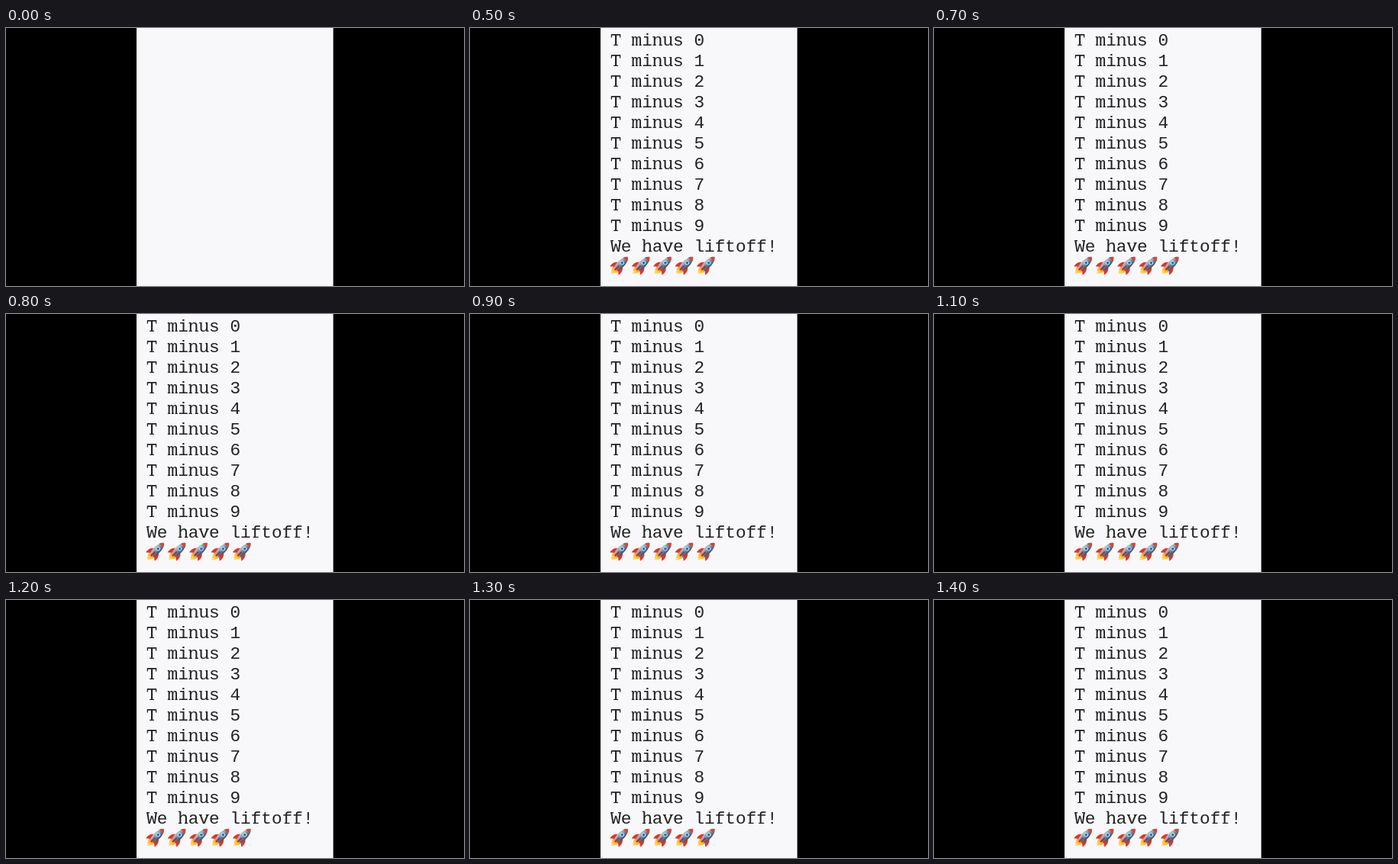
An HTML page for the animation above (1500 ms loop, 600 px wide and 338 px high).

```html
<!DOCTYPE html>
<html lang="en">
<head>
<meta charset="utf-8">
<title>Countdown</title>
<style>
  html, body { margin: 0; width: 100%; height: 100%; overflow: hidden; background: #000; }
  svg { display: block; width: 100vw; height: 100vh; }
  text { font: 22.75px "Liberation Mono", monospace; fill: #222; white-space: pre; }
  #serifs { fill: none; stroke: #222; stroke-width: 1.3; }
</style>
</head>
<body>
<svg viewBox="0 0 600 338">
  <defs>
    <linearGradient id="hull">
      <stop offset="0" stop-color="#bccbd6"/>
      <stop offset=".45" stop-color="#7893a8"/>
      <stop offset="1" stop-color="#344f69"/>
    </linearGradient>
    <linearGradient id="flame" x2="0" y2="1">
      <stop offset="0" stop-color="#f36b20"/>
      <stop offset=".4" stop-color="#ffbd2e"/>
      <stop offset="1" stop-color="#ffe89a"/>
    </linearGradient>
    <g id="rocket" transform="rotate(45)">
      <path fill="url(#flame)" d="M-3 5C-6 9-3 12 0 16C3 12 6 9 3 5Z"/>
      <path fill="#df3429" d="M-3-2C-8 1-9 5-8 10L-3 6ZM3-2C8 1 9 5 8 10L3 6Z"/>
      <path fill="url(#hull)" d="M0-15C6-10 5.5-1 3.5 7H-3.5C-5.5-1-6-10 0-15Z"/>
      <path fill="#d94336" d="M0-15.5C2-14 3.2-12 3.8-10Q0-11.5-3.8-10C-3.2-12-2-14 0-15.5Z"/>
      <circle cy="-4.5" r="2.3" fill="#2873ad" stroke="#e0e8ed"/>
      <path fill="#b82925" d="M-.9 1H.9V9H-.9Z"/>
    </g>
  </defs>
  <path fill="#f8f7f9" d="M171 0H428.7V338H171Z"/>
  <g id="output" visibility="hidden">
    <g id="lines"></g>
    <path id="serifs"/>
    <g id="rockets"></g>
  </g>
</svg>
<script>
const $ = id => document.getElementById(id);
const left = 184.2, advance = 13.65, firstBaseline = 23, lineHeight = 27;
const lines = [...Array.from({ length: 10 }, (_, i) => `T minus ${i}`), "We have liftoff!"];

// Slab ends added to the plain monospaced letters, relative to the baseline.
const slabs = {
  T: "M4 -.7h5.7M1.2 -14.5v4M12.4 -14.5v4",
  m: "M.4 -.7h3.4M5.4 -.7h3M10 -.7h3.3M.2 -11.3h2",
  n: "M.7 -.7h4.4M8.8 -.7h4.3M.6 -11.3h2.4",
  h: "M.7 -.7h4.4M8.8 -.7h4.3M.6 -15.8h2.4",
  u: "M.6 -11.3h2.4M8.8 -11.3h2.2M10.7 -.7h2.4",
  f: "M3 -.7h7",
  W: "M-.2 -14.3h4M9.8 -14.3h4",
  v: "M.3 -11.3h4M9.3 -11.3h4"
};

let serifPath = "";
lines.forEach((line, row) => {
  const y = firstBaseline + row * lineHeight;
  $("lines").innerHTML += `<text x="${left}" y="${y}">${line}</text>`;
  [...line].forEach((letter, column) => {
    const x = left + column * advance;
    serifPath += (slabs[letter] || "").replace(/M(\S+) (-[\d.]+)/g,
      (_, dx, dy) => `M${x + +dx} ${y + +dy}`);
  });
});
$("serifs").setAttribute("d", serifPath);

for (let i = 0; i < 5; i++)
  $("rockets").innerHTML += `<use href="#rocket" x="0" y="0" transform="translate(${196 + i * 28.4} 310.8)"/>`;

function draw() {
  $("output").setAttribute("visibility", performance.now() % 1500 < 500 ? "hidden" : "visible");
  requestAnimationFrame(draw);
}
draw();
</script>
</body>
</html>
```
